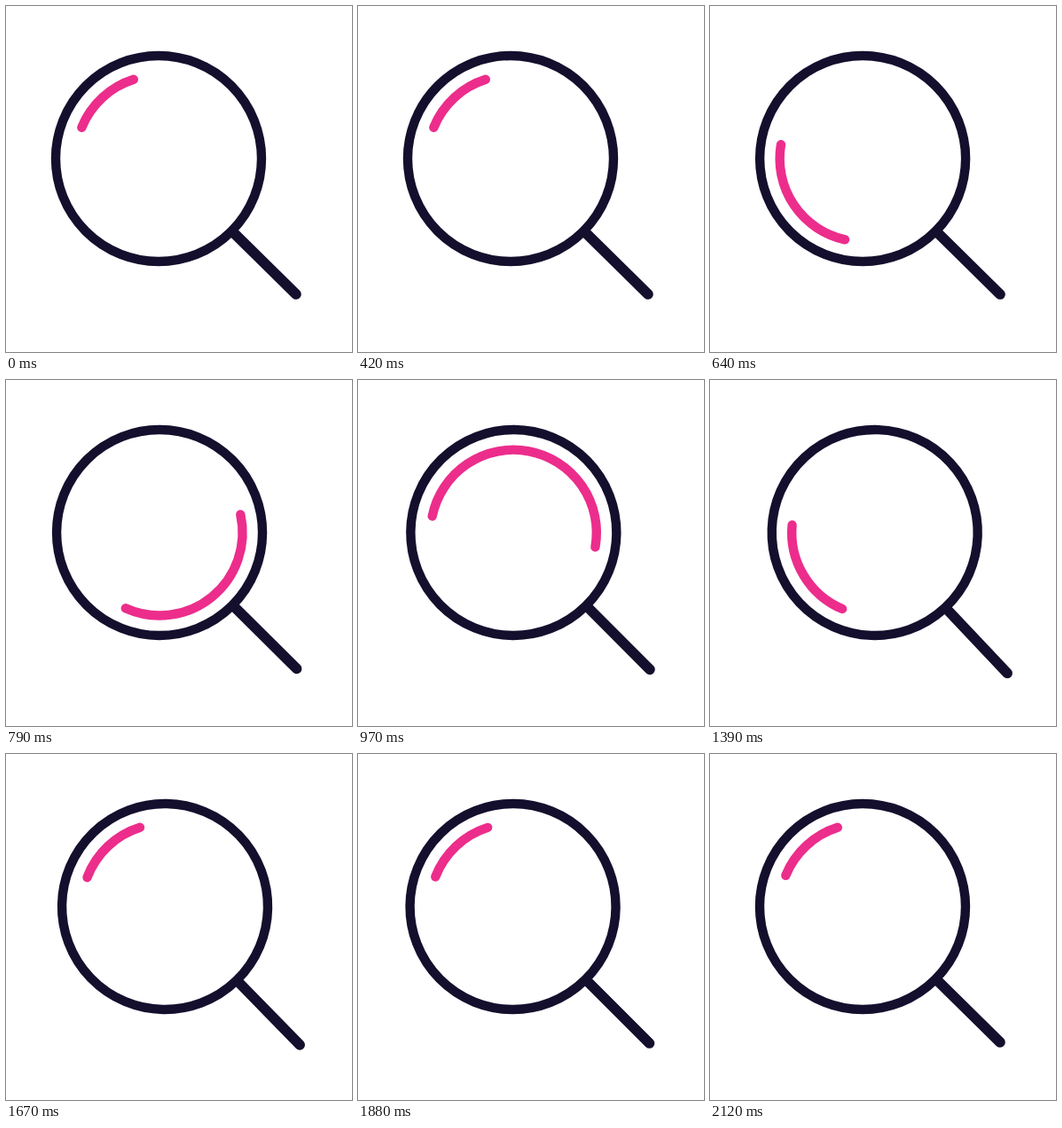
Recreate the animation shown at these times as an HTML page. Size 390x390 px, loop 2210 ms.

```html
<!DOCTYPE html>
<html lang="en">
<head>
<meta charset="utf-8">
<title>Magnifying glass</title>
<style>
  html, body { margin: 0; width: 100%; height: 100%; overflow: hidden; background: #fff; }
  svg { display: block; width: 100%; height: 100%; }
  svg * { fill: none; stroke-linecap: round; }
</style>
</head>
<body>
<svg viewBox="0 0 390 390">
  <g id="glass">
    <path d="M84 83L155 153" stroke="#140f2d" stroke-width="11.6"/>
    <circle r="116" stroke="#140f2d" stroke-width="10.4"/>
    <path id="shine" stroke="#ec2d8c" stroke-width="10.4"/>
  </g>
</svg>
<script>
const LOOP = 2210;
const CENTER = 172;
const SHINE_RADIUS = 93.5;
const SWAY = { start: 560, peak: 1400, end: 2060, shift: 14, tilt: 2.1 };

// Counter-clockwise travel in degrees of the two ends of the shine: three turns.
const TIMES = [420, 790, 1180, 1390, 1670, 2120];
const LEAD = [0, 214, 584, 810, 1082.5, 1080];
const TRAIL = [0, 138, 419, 788, 1081, 1080];

const glass = document.getElementById('glass');
const shine = document.getElementById('shine');

// Cubic through the keys that never overshoots between them.
function smoothTrack(times, values) {
  const last = times.length - 1;
  const slopes = values.slice(1).map((v, i) => (v - values[i]) / (times[i + 1] - times[i]));
  const tangents = values.map((_, i) => {
    if (i === 0 || i === last) return 0;
    const a = slopes[i - 1], b = slopes[i];
    return a * b > 0 ? 2 * a * b / (a + b) : 0;
  });
  return t => {
    if (t <= times[0]) return values[0];
    if (t >= times[last]) return values[last];
    const i = times.findIndex(x => x > t) - 1;
    const span = times[i + 1] - times[i];
    const u = (t - times[i]) / span, w = 1 - u;
    return w * w * ((1 + 2 * u) * values[i] + u * span * tangents[i])
         + u * u * ((1 + 2 * w) * values[i + 1] - w * span * tangents[i + 1]);
  };
}

const leadAt = smoothTrack(TIMES, LEAD);
const trailAt = smoothTrack(TIMES, TRAIL);

function swayAt(t) {
  const { start, peak, end } = SWAY;
  if (t <= start || t >= end) return 0;
  return t < peak
    ? ((t - start) / (peak - start)) ** 2
    : ((end - t) / (end - peak)) ** 1.3;
}

function pointAt(degrees) {
  const a = degrees * Math.PI / 180;
  return `${(SHINE_RADIUS * Math.cos(a)).toFixed(2)} ${(SHINE_RADIUS * Math.sin(a)).toFixed(2)}`;
}

function draw(t) {
  const sway = swayAt(t);
  glass.setAttribute('transform',
    `translate(${CENTER + SWAY.shift * sway} ${CENTER}) rotate(${SWAY.tilt * sway})`);

  const from = 202 - leadAt(t);
  const to = 252.5 - trailAt(t);
  const large = to - from > 180 ? 1 : 0;
  shine.setAttribute('d',
    `M${pointAt(from)}A${SHINE_RADIUS} ${SHINE_RADIUS} 0 ${large} 1 ${pointAt(to)}`);
}

const began = performance.now();
function tick() {
  draw((performance.now() - began) % LOOP);
  requestAnimationFrame(tick);
}
tick();
</script>
</body>
</html>
```
